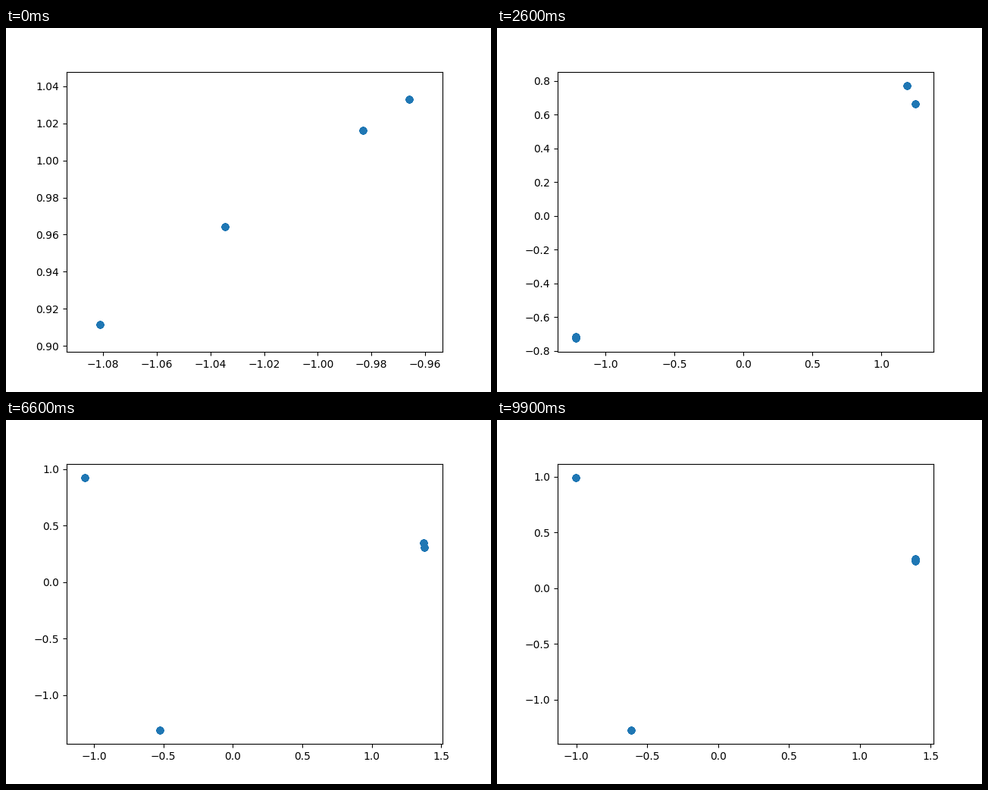
These frames come from a looping animation (640 by 480 pixels, 10000 ms). A matplotlib script:

```python
import numpy as np
import matplotlib.pyplot as plt
from matplotlib.animation import FuncAnimation

FRAMES, INTERVAL = 100, 100
RADIUS = np.sqrt(2)
COPIES = 16  # stacked markers give the crisp, saturated edge


def linear(s):
    return s


def accelerate(s):
    return s ** 3


def settle(s):
    return 1 - (1 - s) ** 2


def smooth(s):
    return s * s * (3 - 2 * s)


def burst(s):
    s = s ** 0.75
    return s ** 3 * (10 - 15 * s + 6 * s * s)


# step, easing on the way there, angles of the four points on the circle
POSES = [
    (0, linear, (139.86, 137.02, 134.05, 133.08)),  # one cluster
    (12, linear, (108.63, 104.43, 103.69, 101.585)),
    (26, burst, (210.7, 210.45, 33.07, 27.98)),     # two opposite pairs
    (38, accelerate, (236.2, 184.06, 34.5, 34.4)),  # one pair splits
    (52, smooth, (250.6, 143.5, 16.8, 15.7)),       # three corners
    (81, settle, (247.3, 137.3, 13.2, 11.6)),
    (99, linear, (244.4, 135.3, 10.66, 9.97)),
]


def angles_at(step):
    for (t0, _, a), (t1, ease, b) in zip(POSES, POSES[1:]):
        if step <= t1:
            a, b = np.array(a), np.array(b)
            return a + (b - a) * ease((step - t0) / (t1 - t0))


def limits(v, pixels):
    """Data range widened by the marker radius and a 5 % margin."""
    pad = 3 / pixels
    lo, hi = v.min() - pad, v.max() + pad
    margin = 0.05 * (hi - lo)
    return lo - margin, hi + margin


fig, ax = plt.subplots(figsize=(6.4, 4.8), dpi=100)
dots = ax.scatter(np.zeros(4 * COPIES), np.zeros(4 * COPIES), color="C0")


def update(step):
    a = np.radians(angles_at(step))
    pts = RADIUS * np.column_stack([np.cos(a), np.sin(a)])
    dots.set_offsets(np.repeat(pts, COPIES, axis=0))
    ax.set_xlim(*limits(pts[:, 0], 496))
    ax.set_ylim(*limits(pts[:, 1], 369.6))
    return (dots,)


anim = FuncAnimation(fig, update, frames=FRAMES, interval=INTERVAL,
                     init_func=lambda: update(0), repeat=True, repeat_delay=0)
plt.show()
```
